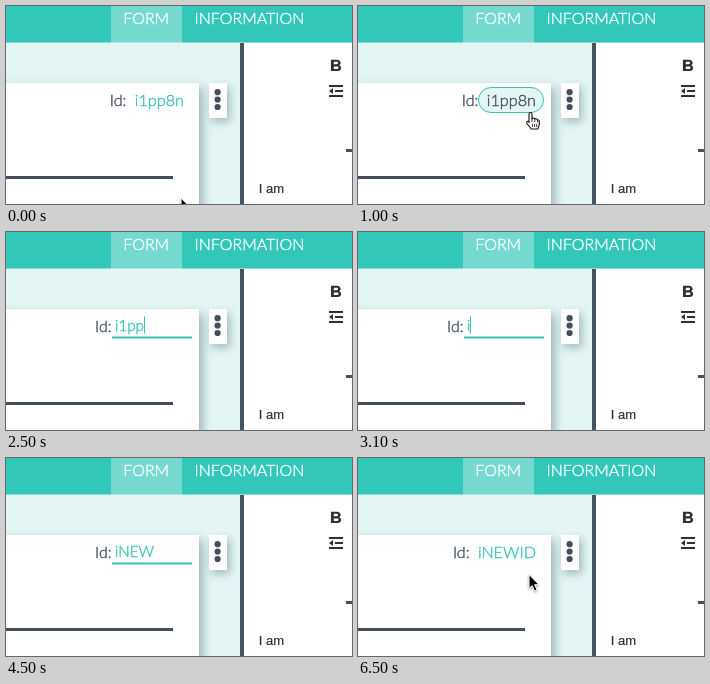
Write an HTML page that moves like this. It is 346 px wide and 198 px high and loops after 6.7 s.

```html
<!DOCTYPE html>
<html lang="en">
<head>
<meta charset="utf-8">
<title>Inline id editor</title>
<style>
  html, body { margin: 0; width: 100%; height: 100%; overflow: hidden; }
  #stage { position: relative; width: 346px; height: 198px; overflow: hidden; background: #e3f5f5; }
  #stage > * { position: absolute; }
  .header { left: 0; top: 0; width: 346px; height: 37px; background: #33c7ba; }
  .tab { left: 105px; top: 0; width: 71px; height: 37px; background: #76d9d0; }
  .edge { left: 0; top: 36px; width: 346px; height: 1px; background: rgba(255, 255, 255, .4); }
  .panel { left: 234px; top: 37px; width: 108px; height: 161px; border-left: 4px solid #43535f; background: #fff; }
  .card { left: -20px; top: 77px; width: 213px; height: 140px; background: #fff; box-shadow: 3px 5px 10px rgba(0, 30, 35, .34); }
  .menu { left: 203px; top: 77px; width: 18px; height: 35px; background: #fff; box-shadow: 3px 4px 9px rgba(0, 30, 35, .27); }
  svg { left: 0; top: 0; }
  text { font: 300 16px Lato, sans-serif; white-space: pre; stroke-width: .4; }
  .white { fill: #fff; stroke: #fff; }
  .ink { fill: #454d60; }
  .teal { fill: #36c3b8; }
  text.ink { stroke: #454d60; }
  .note { font: 13px "Liberation Sans", Arial, sans-serif; fill: #2d2f3c; stroke: #2d2f3c; stroke-width: .2; }
  #arrow { filter: drop-shadow(0 1px 1px rgba(0, 0, 0, .4)); }
</style>
</head>
<body>
<div id="stage">
  <div class="header"></div>
  <div class="tab"></div>
  <div class="edge"></div>
  <div class="card"></div>
  <div class="menu"></div>
  <div class="panel"></div>
  <svg width="346" height="198" viewBox="0 0 346 198">
    <g class="white">
      <text x="117.3" y="18">FORM</text>
      <text x="188.6" y="18">INFORMATION</text>
    </g>

    <g class="ink">
      <circle cx="211.6" cy="86.2" r="3.1"/>
      <circle cx="211.6" cy="93.6" r="3.1"/>
      <circle cx="211.6" cy="101" r="3.1"/>
      <rect y="170" width="167" height="3"/>
      <rect x="340" y="143" width="6" height="3"/>
    </g>

    <g fill="#303033">
      <path transform="translate(318.3 50.6) scale(.95 .8)" d="M15.6 10.8c1-.7 1.65-1.8 1.65-2.8 0-2.26-1.75-4-4-4H7v14h7.04c2.1 0 3.7-1.7 3.7-3.8 0-1.5-.85-2.8-2.14-3.4zM10 6.5h3c2 0 2 3 0 3h-3zm3.5 9H10v-3h3.5c2 0 2 3 0 3z"/>
      <path d="M323 79h14v2H323zM329 84h8v2H329zM323 89h14v2H323zM323 85l4 -3v6z"/>
    </g>
    <text class="note" x="252.8" y="187">I am</text>

    <rect id="pill" x="120.5" y="81.5" width="65" height="25" rx="12.5" fill="#e3f5f5" stroke="#36c3b8"/>
    <text id="label" class="ink" y="100">Id:</text>
    <text id="value"></text>
    <rect id="underline" class="teal" x="106" y="104.5" width="80" height="2"/>
    <rect id="caret" class="teal" y="84.5" width="1" height="17"/>

    <path id="arrow" d="M0 0V14L3.2 11.2 5.6 16.6 8 15.5 5.7 10.2H10Z" fill="#000" stroke="#fff"/>
    <g id="hand" fill="#fff" stroke="#111" stroke-width="1.1" stroke-linejoin="round">
      <path d="M3 10V2Q3 .5 4.5 .5T6 2V7Q6 6 7.3 6T8.8 7.2Q9 6.5 10.1 6.7T11.5 8Q13.3 7.7 13.3 9.3V12.3L11.8 17H5.3L1 11.5Q0 9.6 1.5 9.3T3 10.5Z"/>
      <path d="M6 7V10M8.8 7.2V10M11.5 8V10.4M6.6 12V15M8.6 12V15M10.6 12V15" fill="none" stroke-width=".8"/>
    </g>
    <path id="beam" d="M-3 -6.5Q0 -6.5 0 -4.5Q0 -6.5 3 -6.5M0 -4.5V4.5M-3 6.5Q0 6.5 0 4.5Q0 6.5 3 6.5M-1.5 2.5H1.5" fill="none" stroke="#111" stroke-width="1.2"/>
  </svg>
</div>
<script>
  const LOOP = 6700, STEP = 100;
  const EDIT = 1700, COMMIT = 5900;
  const OLD_ID = "i1pp8n", NEW_ID = "iNEWID";
  const $ = id => document.getElementById(id);

  // Each keystroke: time and resulting text; it also restarts the caret blink.
  const keys = [
    [EDIT, OLD_ID], [2400, "i1pp8"], [2500, "i1pp"], [2700, "i1p"],
    [2900, "i1"], [3000, "i"], [3600, "iN"], [3800, "iNE"],
    [4000, "iNEW"], [4700, "iNEWI"], [4900, NEW_ID]
  ];

  // Pointer phases: shape, start, end, then [time, x, y] points.
  const pointers = [
    ["arrow", 0, 700, [[0, 175, 192], [700, 172, 106]]],
    ["hand", 700, EDIT, [[1100, 168, 106], [1500, 165, 98]]],
    ["beam", EDIT, 2400, [[1900, 169.5, 98], [2200, 172.5, 97.5]]],
    ["arrow", 5600, LOOP, [[5600, 173, 108], [6100, 171, 116.5]]]
  ];

  const clamp = v => Math.max(0, Math.min(1, v));
  const show = (el, on) => el.setAttribute("visibility", on ? "visible" : "hidden");
  const mix = (a, b, p) => a + (b - a) * p;

  function drawPointer(t) {
    for (const id of ["arrow", "hand", "beam"]) show($(id), false);
    const active = pointers.find(([, start, end]) => t >= start && t < end);
    if (!active) return;
    const [id, , , [[t0, x0, y0], [t1, x1, y1]]] = active;
    const p = clamp((t - t0) / (t1 - t0));
    $(id).setAttribute("transform", `translate(${mix(x0, x1, p)} ${mix(y0, y1, p)})`);
    show($(id), true);
  }

  function drawField(t) {
    const editing = t >= EDIT && t < COMMIT;
    const value = $("value");
    const [since, typed] = keys.filter(k => k[0] <= t).pop() || [0, OLD_ID];
    value.textContent = typed;
    value.style.fontSize = editing ? "15.2px" : "16.2px";
    const width = value.getComputedTextLength();
    const left = editing ? 109 : 178 - width;
    value.setAttribute("x", left);
    value.setAttribute("y", editing ? 98.7 : 100);
    $("label").setAttribute("x", editing ? 89 : left - 25);

    const hover = t < EDIT ? clamp((t - 600) / 400) : 0;
    $("pill").setAttribute("opacity", hover);
    const rgb = [[54, 69], [195, 77], [184, 96]].map(([a, b]) => Math.round(mix(a, b, hover)));
    value.style.fill = value.style.stroke = `rgb(${rgb})`;

    show($("underline"), editing);
    show($("caret"), editing && t < 5600 && (t - since) % 1000 < 500);
    $("caret").setAttribute("x", Math.round(left + width));
  }

  function frame(now) {
    const t = Math.floor((now % LOOP) / STEP) * STEP;
    drawField(t);
    drawPointer(t);
    requestAnimationFrame(frame);
  }
  frame(0);
</script>
</body>
</html>
```
